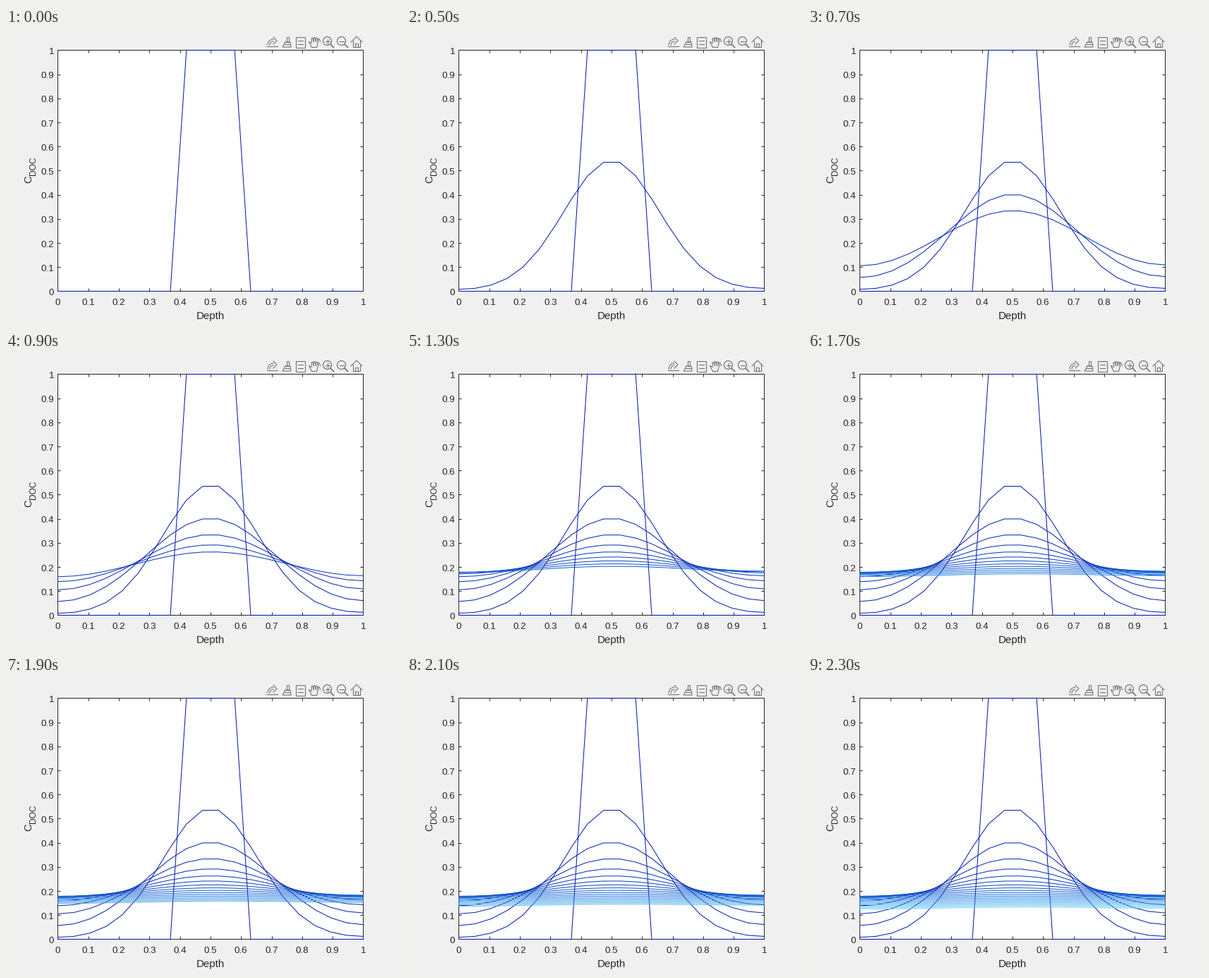
Write a matplotlib script that moves like this. It is 560x420 px and loops after 2400 ms.

```python
import numpy as np
import matplotlib.pyplot as plt
from matplotlib.animation import FuncAnimation
from matplotlib.patches import Circle, Rectangle

W, H, DPI = 560, 420, 100
PX = 72 / DPI  # one pixel in points
LEFT, RIGHT, TOP, BOTTOM = 73.49, 506.49, 31.49, 373.49
INK, GREY, BACK = "#262626", "#737373", "#f0f0f0"
FRAMES, HOLD, NODES = 24, 5, 20
CELLS = NODES - 1

plt.rcParams["font.family"] = "Liberation Sans"
fig = plt.figure(figsize=(W / DPI, H / DPI), dpi=DPI, facecolor=BACK)

ax = fig.add_axes([LEFT / W, 1 - BOTTOM / H, (RIGHT - LEFT) / W, (BOTTOM - TOP) / H])
ticks = np.linspace(0, 1, 11)
ax.set(xlim=(0, 1), ylim=(0, 1), xticks=ticks, yticks=ticks)
ax.tick_params(direction="in", length=4 * PX, width=PX, color=INK, top=True, right=True,
               labelbottom=False, labelleft=False)
for spine in ax.spines.values():
    spine.set(linewidth=PX, edgecolor=INK)

# Overlay in pixel coordinates, y pointing down
ui = fig.add_axes([0, 0, 1, 1], facecolor="none")
ui.set(xlim=(0, W), ylim=(H, 0))
ui.axis("off")


def label(x, y, text, size, ha="center", rotation=0):
    ui.text(x, y, text, fontsize=size * PX, color=INK, ha=ha, va="baseline",
            rotation=rotation, rotation_mode="anchor")


def stroke(*points, width=1.1):
    ui.plot(*zip(*points), color=GREY, lw=width * PX, solid_joinstyle="round")


def box(x, y, w, h):
    ui.add_patch(Rectangle((x, y), w, h, facecolor="none", edgecolor=GREY, lw=1.1 * PX))


def draw_labels():
    for t in ticks:
        label(LEFT + (RIGHT - LEFT) * t, 393, f"{t:g}", 13.33)
        label(68, BOTTOM - (BOTTOM - TOP) * t + 5.5, f"{t:g}", 13.33, ha="right")
    label(289.5, 413, "Depth", 15)
    label(36, 220, "C", 15, ha="left", rotation=90)
    label(42, 209, "DOC", 12, ha="left", rotation=90)


def export_icon(x, y):
    angle = np.linspace(np.pi, 1.5 * np.pi, 8)
    for radius in (5, 8):
        stroke(*zip(x + 2 + radius * np.cos(angle), y + 4 + radius * np.sin(angle)))
    stroke((x + 2, y - 7), (x + 7, y - 2), (x + 2, y + 3))
    stroke((x - 7, y + 6), (x + 8, y + 6))


def brush_icon(x, y):
    box(x - 1, y - 7, 3, 7)
    stroke((x - 3, y), (x + 4, y), (x + 5, y + 7), (x - 7, y + 7), (x - 3, y))
    stroke((x - 4, y + 3), (x + 4, y + 3))


def note_icon(x, y):
    box(x - 6, y - 7, 13, 15)
    for dy in (-2, 3):
        stroke((x - 3, y + dy), (x + 4, y + dy))


def hand_icon(x, y):
    for i in range(4):
        top = y - 6 + abs(i - 1.2)
        stroke((x - 3 + 3 * i, y), (x - 3.5 + 3 * i, top), (x - 1.5 + 3 * i, top), (x + 3 * i, y))
    stroke((x - 3, y + 2), (x - 7, y), (x - 3, y + 8), (x + 4, y + 8), (x + 6, y))


def zoom_icon(x, y, plus):
    ui.add_patch(Circle((x, y), 6, facecolor="none", edgecolor=GREY, lw=1.2 * PX))
    stroke((x + 4.5, y + 4.5), (x + 9, y + 9), width=1.7)
    stroke((x - 3, y), (x + 3, y))
    if plus:
        stroke((x, y - 3), (x, y + 3))


def home_icon(x, y):
    stroke((x - 8, y), (x, y - 8), (x + 8, y))
    stroke((x - 5, y - 2), (x - 5, y + 7), (x + 5, y + 7), (x + 5, y - 2))
    box(x - 2, y + 2, 4, 5)


def draw_toolbar():
    export_icon(377, 20)
    brush_icon(399, 20)
    note_icon(417, 19.5)
    hand_icon(436.5, 19.5)
    zoom_icon(455.5, 18.5, plus=True)
    zoom_icon(475.5, 18.5, plus=False)
    home_icon(497, 20)


def profile(step):
    """Pulse that diffuses between closed ends while its total is slowly used up."""
    x = np.arange(NODES) / CELLS
    pulse = abs(x - 0.5) < 0.1
    if step == 0:
        return x, pulse.astype(float)
    phase = 2 * np.pi * (x - 0.5)
    conc = 0.2465 - 0.0061 * step - 0.04 * 0.62**step
    for n in (1, 2, 3):
        weight = 2 * np.cos(n * phase[pulse]).sum() / CELLS
        decay = np.exp(-15.6 * step * np.sin(n * np.pi / CELLS) ** 2)
        conc = conc + weight * decay * np.cos(n * phase)
    return x, conc + 0.003 * np.cos(phase) + 0.002 * np.sin(phase / 2)


def shade(step):
    t = step / (FRAMES - HOLD)
    return 0.39 * t**2.5, 0.08 + 0.72 * t**1.3, 0.67 + 0.31 * t


draw_labels()
draw_toolbar()
curves = [ax.plot(*profile(k), color=shade(k), lw=PX, clip_on=False, zorder=3 + k / 100)[0]
          for k in range(FRAMES - HOLD + 1)]


def update(frame):
    shown = max(0, frame - HOLD + 1)
    for k, curve in enumerate(curves):
        curve.set_visible(k <= shown)
    return curves


anim = FuncAnimation(fig, update, frames=FRAMES, interval=100, repeat=True, repeat_delay=0)
plt.show()
```
